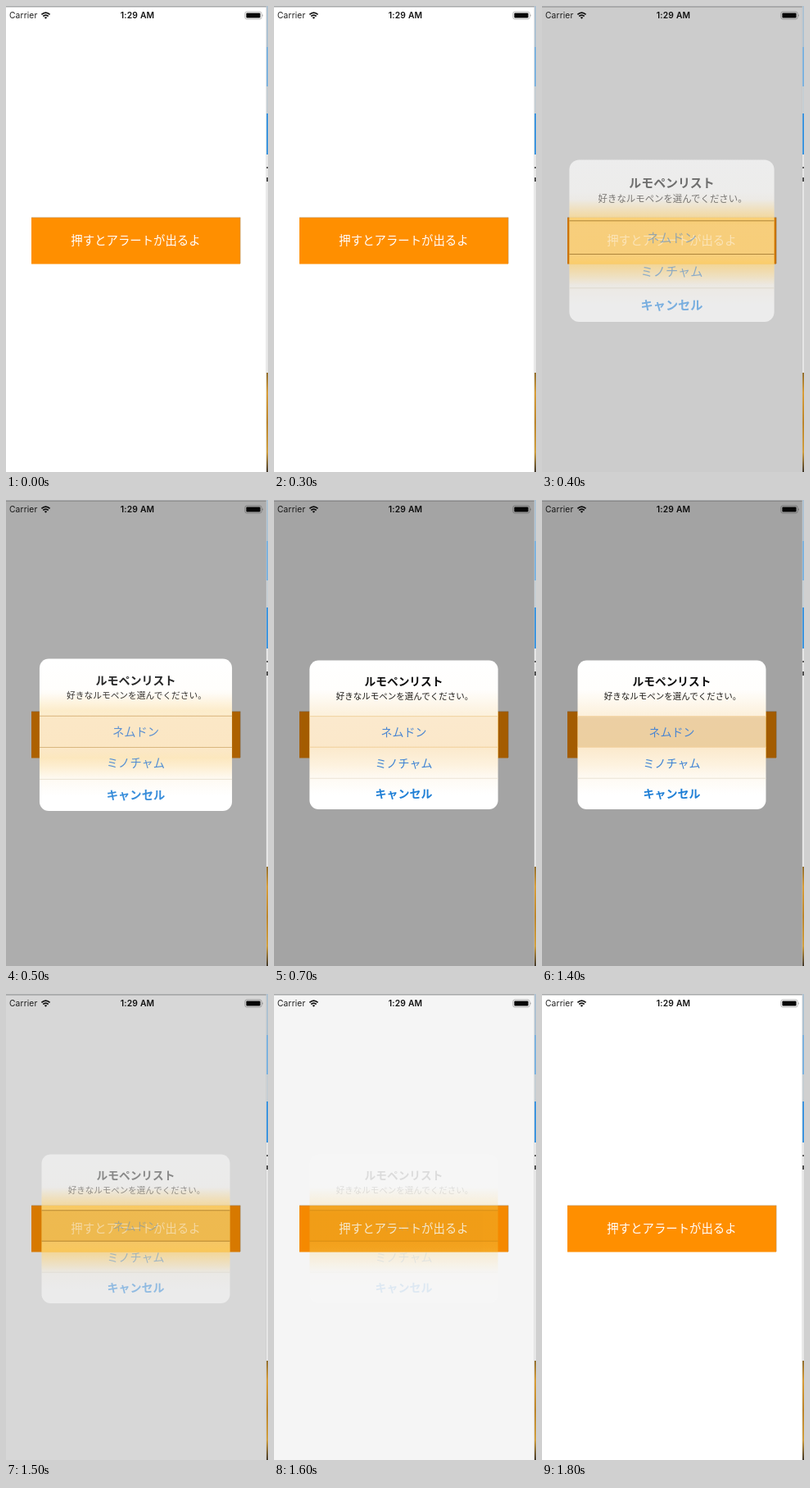
An HTML page for the animation above (1900 ms loop, 320x568 px).

```html
<!DOCTYPE html>
<html lang="ja">
<head>
<meta charset="utf-8">
<title>Alert demo</title>
<style>
  html, body { margin: 0; width: 100%; height: 100%; overflow: hidden; background: #fff; }
  svg { display: block; width: 100vw; height: 100vh; }
  text { font-family: "Noto Sans CJK JP", "Noto Sans CJK", sans-serif; text-anchor: middle; }
  .bar { font-family: Inter, Roboto, sans-serif; font-size: 10.3px; }
</style>
</head>
<body>
<svg viewBox="0 0 320 568" preserveAspectRatio="none">
  <defs>
    <linearGradient id="cream" x1="0" y1="0" x2="0" y2="1">
      <stop offset="0" stop-color="#fff"/>
      <stop offset=".2" stop-color="#fffefc"/>
      <stop offset=".375" stop-color="#fcf0db"/>
      <stop offset=".39" stop-color="#fbe9cd"/>
      <stop offset=".57" stop-color="#fbe8ca"/>
      <stop offset=".7" stop-color="#fdf2df"/>
      <stop offset=".79" stop-color="#fefaf3"/>
      <stop offset=".9" stop-color="#fff"/>
    </linearGradient>
    <linearGradient id="warm" x1="0" y1="0" x2="0" y2="1">
      <stop offset="0" stop-color="#ffc540" stop-opacity="0"/>
      <stop offset=".2" stop-color="#ffc540" stop-opacity=".36"/>
      <stop offset=".3" stop-color="#ffc540" stop-opacity=".12"/>
      <stop offset=".65" stop-color="#ffc540" stop-opacity=".12"/>
      <stop offset=".75" stop-color="#ffc540" stop-opacity=".42"/>
      <stop offset="1" stop-color="#ffc540" stop-opacity="0"/>
    </linearGradient>
    <linearGradient id="gold" x1="0" y1="0" x2="0" y2="1">
      <stop offset="0" stop-color="#8a6420"/>
      <stop offset=".2" stop-color="#d8982a"/>
      <stop offset=".5" stop-color="#b87d1c"/>
      <stop offset=".8" stop-color="#d09a30"/>
      <stop offset="1" stop-color="#33291c"/>
    </linearGradient>
    <clipPath id="cardClip"><rect id="clipRect" x="43.5" y="195.5" width="230" height="181.5" rx="11"/></clipPath>
  </defs>

  <rect width="320" height="568" fill="#fff"/>
  <rect x="31" y="258" width="255" height="56.5" fill="#ff8f00"/>
  <path d="M31 257.8H286.2V314" fill="none" stroke="#b98b4c" stroke-width=".6"/>
  <text x="158.5" y="291.3" font-size="14.4" fill="#fff">押すとアラートが出るよ</text>

  <text class="bar" x="4" y="15.2" style="text-anchor:start" letter-spacing=".1" fill="#222">Carrier</text>
  <text class="bar" x="160.5" y="15.2" font-weight="600" letter-spacing=".2" fill="#111">1:29 AM</text>
  <g fill="none" stroke="#111" stroke-width="1.7">
    <path d="M43.4 10.4Q48.5 5.8 53.6 10.4"/>
    <path d="M45.3 12.5Q48.5 9.6 51.7 12.5"/>
  </g>
  <path d="M46.8 14Q48.5 12.6 50.2 14L48.5 15.8Z" fill="#111"/>
  <rect x="291.8" y="7" width="20.4" height="9" rx="2.3" fill="none" stroke="#aaa" stroke-width=".8"/>
  <rect x="293.4" y="8.4" width="17.2" height="6.2" rx="1.1" fill="#080808"/>
  <path d="M313.2 10Q314.6 11.5 313.2 13Z" fill="#888"/>

  <rect y="1" width="318" height="1" fill="#d4d4d4"/>
  <rect id="dim" width="318.2" height="568" fill="#000"/>

  <g id="under" clip-path="url(#cardClip)">
    <rect x="31" y="258" width="255" height="56.5" fill="#eea200"/>
    <text x="158.5" y="291.3" font-size="14.4" fill="#fff" fill-opacity=".75">押すとアラートが出るよ</text>
  </g>

  <g id="body">
    <rect x="43.5" y="195.5" width="230" height="181.5" rx="11" fill="url(#cream)"/>
    <rect id="press" x="43.5" y="264" width="230" height="37" fill="#b87818" fill-opacity=".23"/>
    <path d="M43.5 263.8h230M43.5 301.2h230" stroke="#f0cc94" stroke-width=".9"/>
    <path d="M43.5 339.2h230" stroke="#e6ddcc" stroke-width=".8"/>
  </g>
  <g id="glow" clip-path="url(#cardClip)">
    <rect x="31" y="236" width="255" height="104" fill="url(#warm)"/>
  </g>
  <g id="words">
    <text x="158.5" y="226" font-size="13.7" font-weight="700" fill="#0c0c0c">ルモペンリスト</text>
    <text x="159.5" y="243" font-size="10.5" fill="#1c1a18">好きなルモペンを選んでください。</text>
    <text x="158.5" y="287.6" font-size="14" fill="#4a86d2">ネムドン</text>
    <text x="158.5" y="325.6" font-size="14" fill="#3f84d4">ミノチャム</text>
    <text x="158.5" y="363.2" font-size="14" font-weight="700" fill="#1f7fd6">キャンセル</text>
  </g>
  <path id="lines" d="M43.5 263.8h230M43.5 301.2h230" stroke="#5a3c10" stroke-width=".9"/>

  <rect width="320" height="1" fill="#a8aaac"/>
  <rect x="317.7" width=".6" height="568" fill="#c0c0c0"/>
  <rect x="318.2" width="2" height="568" fill="#e6e6e6"/>
  <rect x="318.2" width="2" height="50" fill="#a9bfd0"/>
  <rect x="318.2" y="50" width="2" height="48" fill="#74aede"/>
  <rect x="318.2" y="98" width="2" height="33" fill="#c3ccd2"/>
  <rect x="318.2" y="131" width="2" height="50" fill="#2f8ede"/>
  <rect x="318.2" y="196" width="2" height="2" fill="#555"/>
  <rect x="318.2" y="209" width="2" height="5" fill="#444"/>
  <rect x="318.2" y="447" width="2" height="121" fill="url(#gold)"/>
</svg>
<script>
const LOOP = 1900, STEP = 100;
const SHOW = 300, PRESS = 1300, HIDE = 1400, GONE = 1800;
const CX = 158.5, CY = 286.3;
const $ = id => document.getElementById(id);
const fade = (id, v) => $(id).setAttribute('opacity', v.toFixed(4));

// Share of the way left for a critically damped spring after ms
function left(ms) {
  const x = Math.max(0, ms) * 0.0188;
  return (1 + x) * Math.exp(-x);
}

function draw(t) {
  const shown = t > SHOW && t < GONE;
  const rest = left(t - SHOW);
  const alpha = !shown ? 0 : t < HIDE ? 1 - rest : left(t - HIDE);
  const mid = 4 * alpha * (1 - alpha);
  const scale = 1 + 0.2 * rest;
  const move = `translate(${CX} ${CY}) scale(${scale}) translate(${-CX} ${-CY})`;
  for (const id of ['body', 'words', 'lines', 'clipRect']) $(id).setAttribute('transform', move);
  fade('dim', 0.36 * alpha);
  fade('body', Math.min(1, 1.15 * alpha));
  fade('words', alpha);
  fade('under', shown ? Math.min(1, 4 * alpha) : 0);
  fade('glow', mid);
  fade('lines', 0.45 * mid);
  fade('press', t >= PRESS ? 1 : 0);
}

// The picture advances ten times a second
function tick() {
  const t = performance.now() % LOOP;
  draw(Math.floor(t / STEP) * STEP);
  requestAnimationFrame(tick);
}
tick();
</script>
</body>
</html>
```
